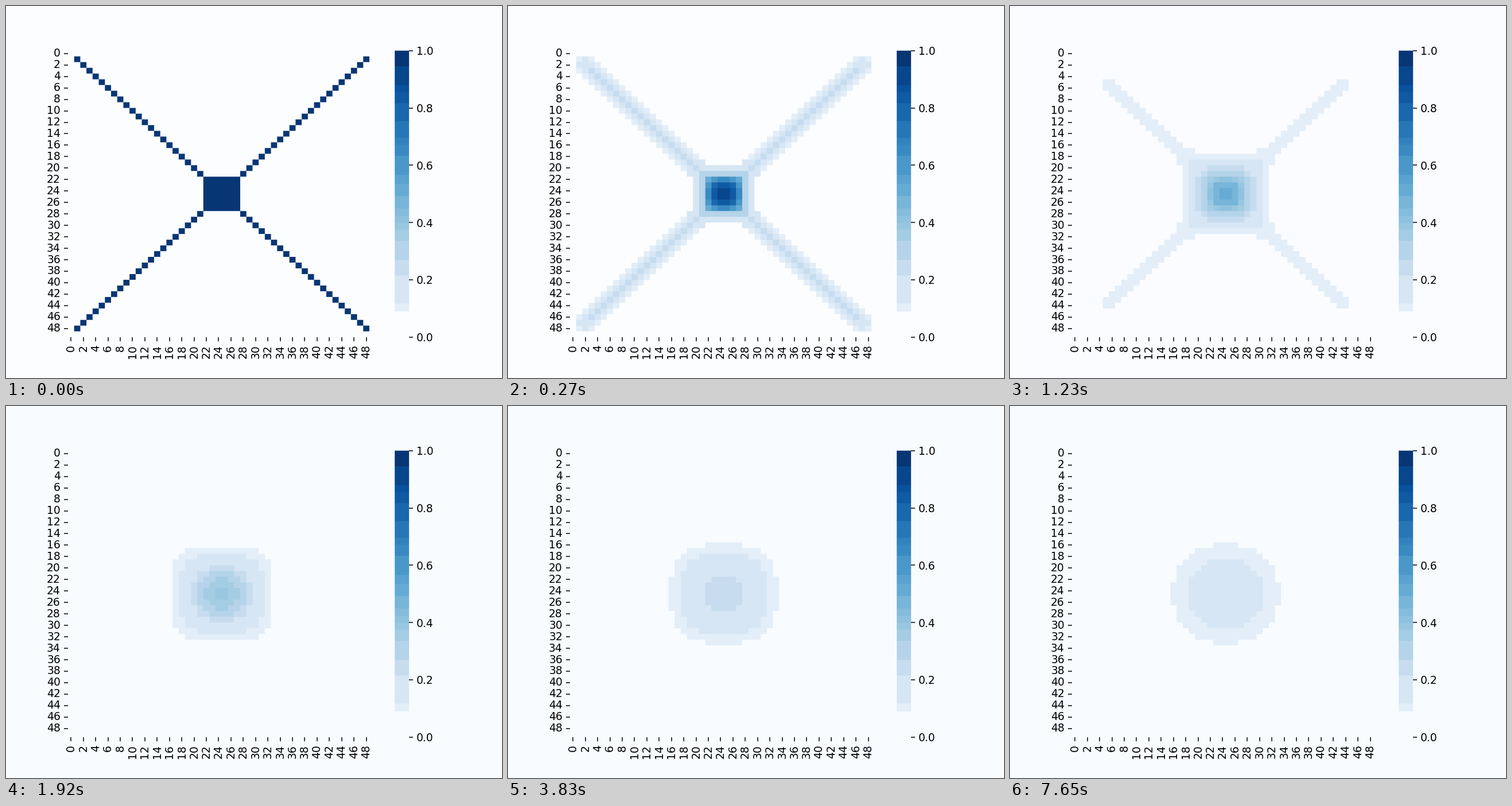
These frames come from a looping animation (864 by 648 pixels, 7.81 s). A matplotlib script:

```python
import matplotlib.pyplot as plt
import numpy as np
from matplotlib.animation import FuncAnimation
from matplotlib.colors import to_rgb
from matplotlib.markers import TICKDOWN, TICKLEFT, TICKRIGHT

W, H, DPI = 864, 648, 135
FRAMES, INTERVAL = 355, 22   # 7810 ms per loop
STEP_MS = 30                 # one diffusion step
SIZE, RATE = 50, 0.1
LEFT, RIGHT, TOP, BOTTOM = 108, 643.68, 77.76, 576.72
BAR_LEFT, BAR_RIGHT = 677.16, 702.11
GAP = 7 * DPI / 72           # tick length plus label pad

# Colour bands, as lower bounds on the 256-level scale
LEVELS = np.array([23, 30, 55, 69, 86, 96, 102, 108, 115, 126, 137,
                   145, 162, 172, 178, 193, 209, 219, 225, 242])
BANDS = LEVELS / 256
MIDS = (BANDS + np.append(BANDS[1:], 1)) / 2
BLUES = plt.get_cmap("Blues")(MIDS)[:, :3]


def start_grid():
    u = np.zeros((SIZE, SIZE))
    i = np.arange(1, SIZE - 1)
    u[i, i] = u[i, SIZE - 1 - i] = 1
    u[22:28, 22:28] = 1
    return u


def heat_kernel(n):
    """Exact one-step propagator for n cells between cold walls."""
    lap = np.eye(n, k=1) + np.eye(n, k=-1) - 2 * np.eye(n)
    rates, modes = np.linalg.eigh(lap)
    return modes * np.exp(RATE * rates) @ modes.T


def step_at(frame):
    return (frame * INTERVAL + INTERVAL - 2) // STEP_MS


def backdrop(step):
    if step < 30:
        return "#fcfdff"
    return "#fafcff" if step < 55 else "#f8fcff"


def coverage(lo, hi, cells):
    """Share of each pixel covered by each of the cells between lo and hi."""
    edges = np.linspace(lo, hi, cells + 1)
    px = np.arange(np.floor(lo), np.ceil(hi))[:, None]
    overlap = np.minimum(edges[1:], px + 1) - np.maximum(edges[:-1], px)
    return np.clip(overlap, 0, None)


class Mesh:
    """Grid of flat cells with smooth edges at fractional pixel positions."""

    def __init__(self, ax, left, right, top, bottom, shape):
        self.rows = coverage(top, bottom, shape[0])
        self.cols = coverage(left, right, shape[1])
        x, y = np.floor(left), np.floor(top)
        extent = (x, x + len(self.cols), y + len(self.rows), y)
        blank = np.zeros((len(self.rows), len(self.cols), 3), np.uint8)
        self.image = ax.imshow(blank, extent=extent, aspect="auto",
                               interpolation="nearest")

    def show(self, values, back):
        back = np.array(to_rgb(back))
        palette = np.vstack([back, BLUES]) - back
        cells = np.moveaxis(palette[np.digitize(values, BANDS)], 2, 0)
        pixels = np.moveaxis(self.rows @ cells @ self.cols.T, 0, 2) + back
        self.image.set_data(np.round(pixels * 255).astype(np.uint8))


kernel = heat_kernel(SIZE - 2)
grids = [start_grid()]
for _ in range(step_at(FRAMES - 1)):
    inner = kernel @ grids[-1][1:-1, 1:-1] @ kernel
    grids.append(np.pad(inner, 1))

plt.rcParams.update({"font.family": "DejaVu Sans", "font.size": 10})
fig = plt.figure(figsize=(W / DPI, H / DPI), dpi=DPI)
ax = fig.add_axes([0, 0, 1, 1])
ax.axis("off")

heat = Mesh(ax, LEFT, RIGHT, TOP, BOTTOM, (SIZE, SIZE))
shades = (np.arange(LEVELS[0], 256)[::-1, None] + 0.5) / 256
bar_end = BOTTOM + BANDS[0] * (TOP - BOTTOM)
bar = Mesh(ax, BAR_LEFT, BAR_RIGHT, TOP, bar_end, shades.shape)
bar.show(shades, backdrop(FRAMES))
ax.set(xlim=(0, W), ylim=(H, 0))


def ticks(x, y, marker):
    x, y = np.broadcast_arrays(x, y)
    ax.plot(x, y, ls="", marker=marker, ms=3.5, mew=0.8, color="black")


numbers = np.arange(0, SIZE, 2)
xs = LEFT + (numbers + 0.5) * (RIGHT - LEFT) / SIZE
ys = TOP + (numbers + 0.5) * (BOTTOM - TOP) / SIZE
ticks(xs, BOTTOM, TICKDOWN)
ticks(LEFT, ys, TICKLEFT)
for n, x, y in zip(numbers, xs, ys):
    ax.text(x, BOTTOM + GAP, str(n), rotation=90, ha="center", va="top")
    ax.text(LEFT - GAP, y, str(n), ha="right", va="center")

scale = np.linspace(0, 1, 6)
marks = BOTTOM + scale * (TOP - BOTTOM)
ticks(BAR_RIGHT, marks, TICKRIGHT)
for value, y in zip(scale, marks):
    ax.text(BAR_RIGHT + GAP, y, f"{value:.1f}", ha="left",
            va="center_baseline")


def draw(frame):
    step = step_at(frame)
    heat.show(grids[step], backdrop(step))
    fig.set_facecolor(backdrop(step))
    return [heat.image]


anim = FuncAnimation(fig, draw, frames=FRAMES, interval=INTERVAL,
                     init_func=lambda: draw(0), repeat=True, repeat_delay=0)
plt.show()
```
